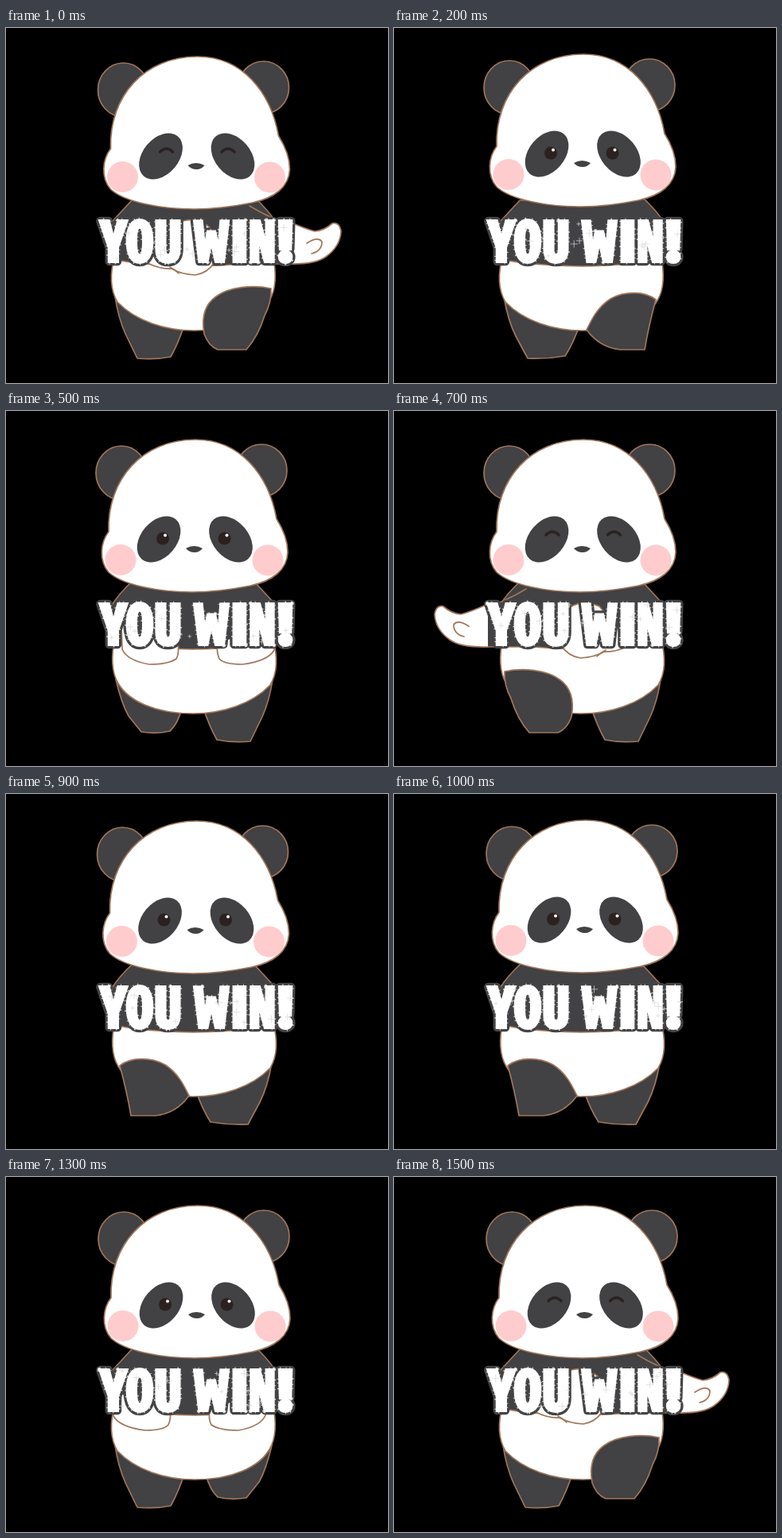
An HTML page with a canvas that plays this animation: 480 px wide and 447 px high, repeating every 1.6 s.

```html
<!DOCTYPE html>
<html lang="en">
<meta charset="utf-8">
<title>You win</title>
<style>
  html, body { margin: 0; height: 100%; overflow: hidden; background: #000; }
  canvas { display: block; }
</style>
<canvas id="stage" width="480" height="447"></canvas>
<script>
const ctx = document.getElementById('stage').getContext('2d');
const DARK = '#424143', LINE = '#a0765a', EYE = '#2b2120', WHITE = '#fff';

const shape = d => new Path2D(d);
const body = {
  belly: shape('M137 285C130 310 131 330 140 345C163 369 200 381 237 381C285 381 318 365 331 343C340 328 340 308 335 285Z'),
  torso: shape('M158 217Q146 230 134 243L126 288Q150 298 237 300Q320 298 342 288L338 243Q330 230 313 214Z'),
  standing: shape('M137 338Q141 365 150 385L165 416Q188 418 207 414Q217 396 224 374Z'),
  leaning: shape('M138 338Q143 368 153 388L168 416Q192 417 215 413Q226 396 233 374Z'),
  short: shape('M334 338Q327 368 318 384L302 404Q282 407 266 403Q256 394 251 374Z'),
  lifted: shape('M333 328C310 323 280 326 264 338C247 350 246 368 249 385Q254 400 266 405L302 405Q317 388 325 362Q334 345 333 328Z'),
  lowered: shape('M329 342C315 331 290 331 272 341C255 352 248 368 242 380Q258 402 284 405L315 405Q320 375 329 342Z'),
  sleeve: shape('M306 224Q332 240 363 250L363 297L300 297'),
  hand: shape('M354 243Q376 253 388 256Q400 255 410 246Q419 244 421 256Q420 275 402 288Q388 298 354 297'),
  thumb: shape('M378 271Q392 262 397 269Q397 281 384 284'),
  folded: shape('M178 296Q194 304 208 303Q219 310 238 311Q254 308 261 296L266 262Q244 232 214 246L190 275Z'),
  fold: shape('M206 301Q212 304 217 309'),
  leftPaw: shape('M134 270L135 301Q143 315 175 319Q198 319 204 312Q208 303 206 292'),
  rightPaw: shape('M256 292Q254 305 258 312Q268 319 292 319Q320 314 326 300L327 270')
};
const head = shape('M132 152C130 85 175 36 241 36C297 36 333 80 343 136C350 147 357 162 357 178C356 200 338 214 310 220C285 225 260 228 237 228C195 228 149 219 132 203C119 188 122 165 132 152Z');
const nose = shape('M229 173Q239 167 250 173Q246 178 240 178Q233 178 229 173Z');

function paint(path, fill, line = LINE, width = 1.7) {
  if (fill) { ctx.fillStyle = fill; ctx.fill(path); }
  if (line) { ctx.strokeStyle = line; ctx.lineWidth = width; ctx.stroke(path); }
}

function oval(x, y, rx, ry, fill, line = null, tilt = 0) {
  const path = new Path2D();
  path.ellipse(x, y, rx, ry, tilt, 0, 7);
  paint(path, fill, line);
}

function drawBody(step) {
  const hands = step < 2, tuck = step > 4;
  paint(tuck ? body.leaning : body.standing, DARK);
  if (hands) paint(body.short, DARK);
  paint(body.belly, WHITE);
  if (!hands) paint(tuck ? body.lowered : body.lifted, DARK);
  paint(body.torso, DARK);
  if (hands) {
    paint(body.leftPaw, WHITE);
    paint(body.rightPaw, WHITE);
  } else if (!tuck) {
    paint(body.folded, WHITE);
    paint(body.fold);
    ctx.save();
    if (step === 2) ctx.translate(-24, 8);
    paint(body.sleeve, DARK);
    paint(body.hand, WHITE);
    paint(body.thumb);
    ctx.restore();
  }
}

function drawHead(smiling) {
  oval(148, 78, 32, 34, DARK, LINE);
  oval(324, 75, 32, 33, DARK, LINE);
  paint(head, WHITE);
  oval(195, 161.5, 22.5, 33, DARK, null, 0.7);
  oval(285.5, 161.5, 22.5, 33, DARK, null, -0.7);
  oval(147, 187.5, 19.5, 19.5, '#ffcccd');
  oval(332, 188, 19.5, 19.5, '#ffcccd');
  paint(nose, DARK, null);
  for (const x of [200, 277.5]) {
    if (smiling) {
      paint(shape(`M${x - 6} 156Q${x + 2} 148 ${x + 10} 156`), null, EYE, 3.5);
    } else {
      oval(x, 160.5, 8, 8, EYE);
      oval(x + 3, 156.5, 2, 2, WHITE);
    }
  }
}

// Each letter keeps its own font so the narrow lettering needs no scaling.
const CAP = 51, BASE = 293.5;
const narrow = ['700', '"Noto Sans Mono CJK JP", "Noto Sans Mono", monospace'];
const wide = ['700', '"DejaVu Sans Mono", monospace'];
const plain = ['900', 'Inter, Roboto, sans-serif'];
const letters = [
  ['Y', 135, narrow], ['O', 168, narrow], ['U', 203.5, narrow],
  ['W', 258, wide], ['I', 293.5, plain], ['N', 322, narrow], ['!', 351, plain]
].map(([char, x, [weight, family]]) => {
  ctx.font = `${weight} 100px ${family}`;
  const size = 100 * CAP / ctx.measureText('W').actualBoundingBoxAscent;
  return { char, x, font: `${weight} ${size}px ${family}` };
});

function strokeLetters(color, width, join, dash = [], offset = 0) {
  ctx.strokeStyle = color;
  ctx.lineWidth = width;
  ctx.lineJoin = join;
  ctx.setLineDash(dash);
  ctx.lineDashOffset = offset;
  for (const { char, x, font } of letters) {
    ctx.font = font;
    ctx.strokeText(char, x, BASE);
  }
  ctx.setLineDash([]);
}

function random(seed) {
  const v = Math.sin(seed * 127.1 + 11.7) * 43758.5453;
  return v - Math.floor(v);
}

function drawText(tick) {
  ctx.textAlign = 'center';
  ctx.miterLimit = 2.5;
  strokeLetters('#444345', 10.5, 'round');
  strokeLetters('#ccc', 7, 'round', [1, 6, 1.5, 11, 1, 4], tick * 5.3);
  strokeLetters(WHITE, 4, 'miter');
  ctx.fillStyle = WHITE;
  for (const { char, x, font } of letters) {
    ctx.font = font;
    ctx.fillText(char, x, BASE);
  }
  for (let i = 0; i < 12; i++) {
    const seed = tick * 40 + i * 3;
    const x = 120 + 240 * random(seed), y = 243 + 48 * random(seed + 1);
    const r = 2 + 3 * random(seed + 2);
    paint(shape(`M${x - r} ${y}h${2 * r}M${x} ${y - r}v${2 * r}`), null, '#d8d8d8', 0.7);
  }
}

const LEAN = [0, 0, 0, 0, -0.5, -1.5, -3, -3];
const LIFT = [-1, 0, 0, 0, 0, -2, -3, -2];

function draw() {
  const tick = Math.floor(performance.now() / 100) % 16;
  const step = (tick + 4) % 8;
  const mirrored = tick >= 4 && tick < 12;
  ctx.fillStyle = '#000';
  ctx.fillRect(0, 0, 480, 447);
  ctx.lineJoin = ctx.lineCap = 'round';

  ctx.save();
  if (mirrored) ctx.transform(-1, 0, 0, 1, 472, 0);
  drawBody(step);
  ctx.restore();

  ctx.save();
  ctx.translate(mirrored ? -3 - LEAN[step] : LEAN[step], LIFT[step]);
  drawHead(step === 3 || step === 4);
  ctx.restore();

  ctx.lineCap = 'butt';
  drawText(tick);
  requestAnimationFrame(draw);
}
draw();
</script>
</html>
```
